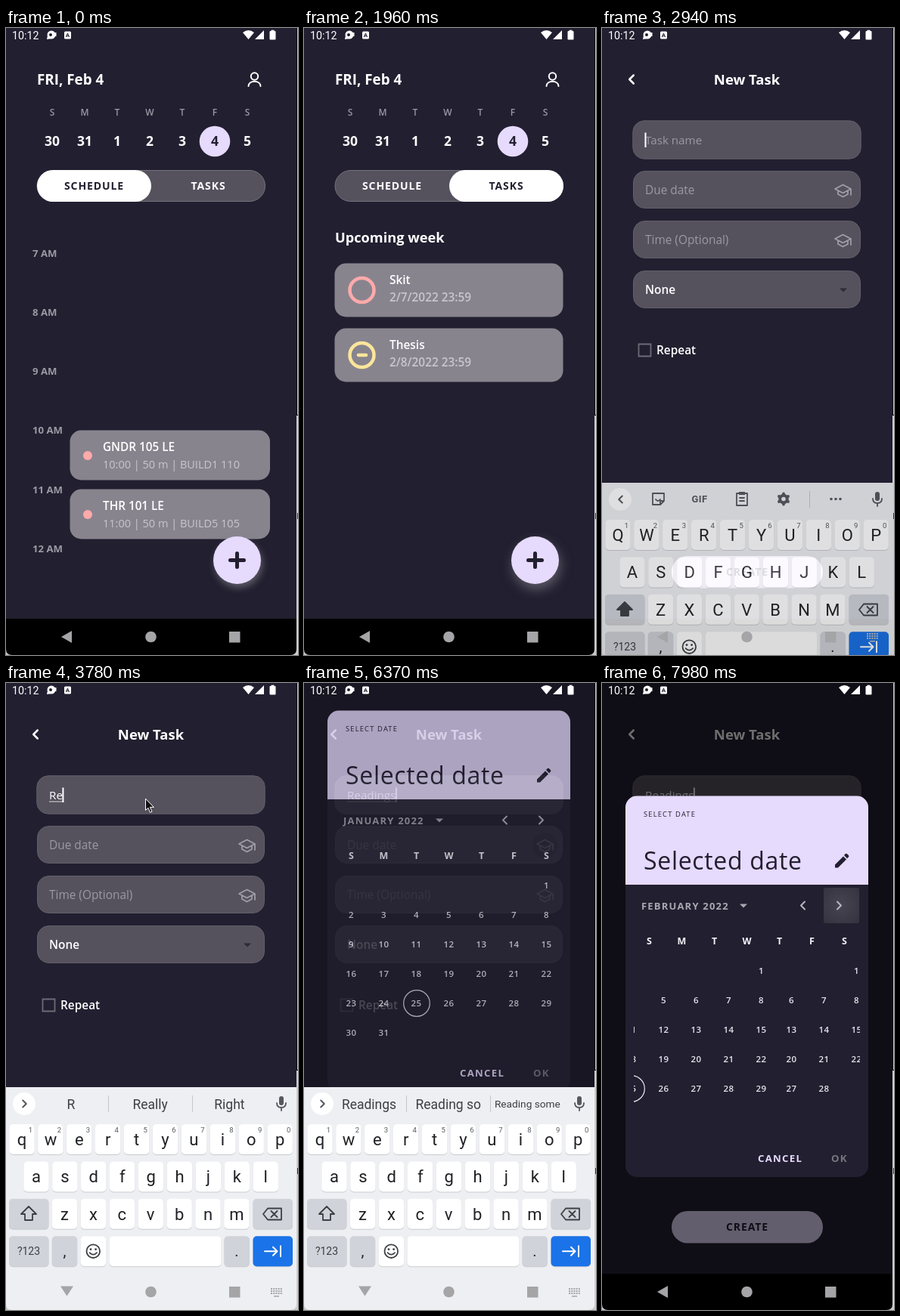
Write an HTML page with a canvas that moves like this. It is 386 px wide and 830 px high and loops after 8 s.

```html
<!DOCTYPE html>
<html lang="en">
<head>
<meta charset="utf-8">
<title>Planner</title>
<style>
html, body { margin: 0; width: 100%; height: 100%; overflow: hidden; background: #221f30; }
canvas { display: block; }
</style>
</head>
<body>
<canvas id="stage" width="386" height="830"></canvas>
<script>
const W = 386, H = 830, SCREEN = 384, LOOP = 8000, STEP = 70;
const APP = '"Open Sans", "Noto Sans", sans-serif', SYS = 'Roboto, sans-serif';
const BG = '#221f30', LILAC = '#e6dafd', CARD = '#88848e', FIELD = '#55525e';
const PINK = '#ffaaaa', YELLOW = '#fbe59b', MUTED = '#9b99a3', INK = '#202124', ICON = '#55585e';

const screenCtx = document.getElementById('stage').getContext('2d');
const spare = Object.assign(document.createElement('canvas'), { width: W, height: H }).getContext('2d');
let g = screenCtx;

// Drawing helpers
function text(s, x, y, size, weight, color, align = 'left', gap = 0, family = APP) {
  g.font = `${weight} ${size}px ${family}`;
  g.letterSpacing = gap + 'px';
  g.textAlign = align;
  g.fillStyle = color;
  g.fillText(s, x, y + size * 0.357);
}
const center = (s, x, y, size, weight, color, gap, family) =>
  text(s, x, y, size, weight, color, 'center', gap, family);
function rect(x, y, w, h, color) { g.fillStyle = color; g.fillRect(x, y, w, h); }
function box(x, y, w, h, r, color, border) {
  g.beginPath();
  g.roundRect(x, y, w, h, r);
  g.fillStyle = color;
  g.fill();
  if (border) { g.strokeStyle = border; g.lineWidth = 1; g.stroke(); }
}
function dot(x, y, r, color) {
  g.beginPath(); g.arc(x, y, r, 0, 7); g.fillStyle = color; g.fill();
}
function ring(x, y, r, width, color) {
  g.beginPath(); g.arc(x, y, r, 0, 7);
  g.strokeStyle = color; g.lineWidth = width; g.stroke();
}
function line(d, color, width = 2) {
  g.strokeStyle = color; g.lineWidth = width; g.stroke(new Path2D(d));
}
function fill(d, color) { g.fillStyle = color; g.fill(new Path2D(d)); }
function chevron(x, y, dir, size, color, width) {
  line(`M${x - dir * size / 2} ${y - size} l${dir * size} ${size} l${-dir * size} ${size}`, color, width);
}
function clipped(x, y, w, h, draw) {
  g.save(); g.beginPath(); g.rect(x, y, w, h); g.clip(); draw(); g.restore();
}
function layer(alpha, draw, dy = 0, scale = 1) {
  if (alpha <= 0) return;
  g = spare;
  g.clearRect(0, 0, W, H);
  draw();
  g = screenCtx;
  g.globalAlpha = alpha;
  g.drawImage(spare.canvas, W / 2 * (1 - scale), H / 2 * (1 - scale) + dy, W * scale, H * scale);
  g.globalAlpha = 1;
}

// Value held at each step of a short move
function moved(t, start, values, before = 0) {
  const i = Math.floor((t - start) / STEP);
  return i < 0 ? before : values[Math.min(i, values.length - 1)];
}

function statusBar() {
  text('10:12', 8, 10, 14.3, 400, '#fff', 'left', 0, SYS);
  dot(60, 9, 5.5, '#fff');
  fill('M54 15 l1 -5 l5 4z', '#fff');
  dot(59, 9, 2, BG);
  rect(65, 6, 1.5, 5, '#fff');
  box(77, 4.5, 9, 10, 1.5, '#fff');
  center('A', 81.5, 9.5, 8, 700, BG, 0, SYS);
  fill('M313 6 Q320.5 0 328 6 L320.5 15z M329 15 L341 3 V15z', '#fff');
  box(348.5, 4, 8, 11.5, 1, '#fff');
  rect(350.5, 2.7, 4, 2, '#fff');
}

function homeHeader(p) {
  text('FRI, Feb 4', 41, 68, 18.8, 700, '#fff');
  ring(328.5, 64, 4.7, 2, '#fff');
  line('M320.5 77 C320.5 68.5 336.5 68.5 336.5 77', '#fff');
  dot(276, 150, 20.3, LILAC);
  ['30', '31', '1', '2', '3', '4', '5'].forEach((day, i) => {
    const x = 61 + i * 43;
    center('SMTWTFS'[i], x, 112, 12, 600, MUTED);
    center(day, x, 150, 17.5, 700, i === 5 ? BG : '#fff');
  });
  const x = 41 + 151 * p;
  const labels = color => {
    center('SCHEDULE', 116.5, 209.5, 14, 700, color, 0.9);
    center('TASKS', 267.5, 209.5, 14, 700, color, 0.9);
  };
  box(41, 188.5, 301.5, 41, 20.5, FIELD, '#72707a');
  labels('#fff');
  g.save();
  g.beginPath();
  g.roundRect(x, 188, 151, 42, 21);
  g.clip();
  rect(x, 188, 151, 42, '#fff');
  labels(BG);
  g.restore();
}

function schedule() {
  for (let i = 0; i < 6; i++) text(`${7 + i} AM`, 35, 298 + i * 78.2, 13.2, 700, MUTED);
  [['GNDR 105 LE', '10:00 | 50 m | BUILD1 110'], ['THR 101 LE', '11:00 | 50 m | BUILD5 105']]
    .forEach(([title, detail], i) => {
      const y = 532.5 + i * 78;
      box(84.5, y, 264.5, 66, 15, CARD);
      dot(108, y + 33.5, 6, PINK);
      text(title, 128, y + 22.5, 15.3, 600, '#fff');
      text(detail, 128, y + 45.5, 14.5, 500, '#c8c6cc');
    });
}

function taskList() {
  text('Upcoming week', 41, 277.5, 18.2, 700, '#fff');
  [['Skit', '2/7/2022 23:59', PINK], ['Thesis', '2/8/2022 23:59', YELLOW]]
    .forEach(([title, due, color], i) => {
      const y = 312 + i * 86;
      box(40.5, y - 0.5, 302, 71, 15, CARD);
      ring(76.5, y + 35, 16, 4.5, color);
      if (i) line(`M72 ${y + 35} h10`, color, 4.5);
      text(title, 113, y + 22, 15.4, 600, '#fff');
      text(due, 113, y + 45, 15.4, 600, '#c8c6cc');
    });
}

function addButton(pressed) {
  g.save();
  g.shadowColor = 'rgba(135,132,142,.6)';
  g.shadowBlur = pressed ? 15 : 10;
  g.shadowOffsetX = 2;
  g.shadowOffsetY = pressed ? 7 : 5;
  dot(305.5, 704.5, 31.5, LILAC);
  g.restore();
  line('M296.5 704.5 h18 M305.5 695.5 v18', BG, 5);
}

function home(t) {
  const p = moved(t, 980, [0.238, 0.55, 0.78, 0.91, 0.98, 1]);
  rect(0, 0, SCREEN, H, BG);
  homeHeader(p);
  clipped(0, 240, SCREEN, 542, () => {
    g.translate(-p * SCREEN, 0);
    if (p < 1) schedule();
    g.translate(SCREEN, 0);
    if (p > 0) taskList();
  });
  addButton(t >= 1960);
}

function gradCap(y) {
  line(`M308 ${y - 2} l10.5 -5.5 l10.5 5.5 l-10.5 5.5z M312 ${y} v5 l6.5 3.5 l6.5 -3.5 v-5 M329 ${y - 2} v8`, '#a19fa8', 1.7);
}

const WORD = 'Readings', TYPED_AT = [3570, 3780, 3850, 4410, 4620, 4690, 4760, 4830];
const typed = t => WORD.slice(0, TYPED_AT.filter(at => at <= t).length);

function newTask(t) {
  rect(0, 0, SCREEN, H, BG);
  chevron(39, 68, -1, 5.5, '#fff', 2.5);
  center('New Task', 191.5, 68, 18.5, 700, '#fff');
  const focused = t >= 2800, name = typed(t);
  ['', 'Due date', 'Time (Optional)', 'None'].forEach((label, i) => {
    const grow = focused && !i ? 0.7 : 0;
    box(41.5 - grow, 123.5 + i * 66 - grow, 300 + 2 * grow, 49 + 2 * grow, 15, FIELD, '#625f6a');
    text(label, 57, 148.5 + i * 66, 15.4, i === 3 ? 600 : 500, i === 3 ? '#fff' : MUTED);
  });
  text(name || 'Task name', 57, 148.5, 15.2, 500, name ? '#fff' : MUTED);
  const end = name ? g.measureText(name).width : 0;
  if (name) rect(57, 156.5, end, 1, '#ddd');
  const caret = (t >= 2870 && t < 3360) || (t >= 3570 && t < 5530) || t >= 6090;
  if (caret) rect(56.5 + end, 138.5, 2, 19.5, '#fff');
  if (t >= 6300 && t < 6720) dot(318.5, 215, 17, 'rgba(0,0,0,.2)');
  gradCap(215);
  gradCap(281);
  fill('M314 344.5 h10 l-5 5z', '#2d2a39');
  g.lineJoin = 'miter';
  line('M48.5 418.5 h16 v16 h-16z', '#6e6b77', 1.8);
  g.lineJoin = 'round';
  text('Repeat', 72, 427, 15.4, 600, '#fff');
  box(92, 699, 200, 42.5, 21, LILAC);
  center('CREATE', 192, 720.5, 14, 700, BG, 0.9);
}

// Month pages: the date grid scrolls sideways under fixed weekday names
function monthPage(x, firstDay, days, circled) {
  for (let d = 1; d <= days; d++) {
    const cell = firstDay + d - 1;
    const cx = x + 62.5 + (cell % 7) * 43, cy = 381 + Math.floor(cell / 7) * 39;
    center(String(d), cx, cy, 11.5, 600, '#e9e7ee', 0.5);
    if (d === circled) ring(cx + 0.5, cy, 17.3, 1.2, '#e9e7ee');
  }
}

function dialog(t) {
  const turn = moved(t, 7840, [0, 0.13, 0.369]) * 298;
  box(31, 149.5, 321, 504.5, 15, BG);
  box(31, 149.5, 321, 117.5, [15, 15, 0, 0], LILAC);
  text('SELECT DATE', 55, 174, 9.3, 500, BG, 'left', 1.2);
  text('Selected date', 55, 236, 32, 500, BG, 'left', 0.7);
  fill('M308 244.5 v-4 l11 -11 l4 4 l-11 11z M320 228 l2 -2 q1 -.6 2 .2 l2 2 q.8 1 0 2 l-2 2z', BG);
  const label = turn ? 'FEBRUARY 2022' : 'JANUARY 2022';
  text(label, 52, 295, 13, 700, '#aaa8b1', 'left', 1.2);
  const x = turn ? 182 : 174;
  fill(`M${x} 292.5 h10 l-5 5z`, '#aaa8b1');
  if (t >= 7840) {
    const glow = g.createRadialGradient(316, 294, 3, 316, 294, 34);
    glow.addColorStop(0, t < 7910 ? '#393643' : '#464350');
    glow.addColorStop(1, '#35323f');
    box(293, 271, 47, 47, 3, glow);
  }
  chevron(265.5, 294.5, -1, 5, '#b9b7c0', 2);
  chevron(313.5, 294.5, 1, 5, '#b9b7c0', 2);
  [...'SMTWTFS'].forEach((s, i) => center(s, 62.5 + i * 43, 342, 12.5, 700, '#f4f2f8'));
  clipped(42, 360, 299, 235, () => {
    monthPage(-turn, 6, 31, 25);
    if (turn) monthPage(298 - turn, 2, 28);
  });
  text('CANCEL', 206, 629, 13.2, 700, LILAC, 'left', 1.3);
  text('OK', 303, 629, 13.2, 700, '#78757f', 'left', 1.2);
}

function suggestions(t) {
  if (t >= 5040) return ['Readings', 'Reading so', 'Reading some'];
  if (t >= 4550) return ['Reading', 'Read', 'Readings'];
  if (t >= 4200) return ['Rea', 'Really', 'Read'];
  if (t >= 3850) return ['', 'Really', 'Read'];
  return ['R', 'Really', 'Right'];
}

function toolbar(t, typing) {
  dot(24, 557, 15, '#fff');
  chevron(24.5, 557, typing ? 1 : -1, 4.5, ICON, 2);
  box(361, 547, 6, 12, 3, ICON);
  line('M358 556 q0 6 6 6 q6 0 6 -6 M364 562 v4', ICON, 1.8);
  if (typing) {
    suggestions(t).forEach((word, i) => {
      g.font = `400 17.5px ${SYS}`;
      g.letterSpacing = '0px';
      const size = 17.5 * Math.min(1, 87 / (g.measureText(word).width || 1));
      center(word, 86 + i * 104.7, 557.5, size, 400, '#3c4043', 0, SYS);
    });
    rect(135, 546, 1, 22, '#c4c6ca');
    rect(246, 546, 1, 22, '#c4c6ca');
    return;
  }
  line('M67 549 h15 v10 l-5 5 h-10z M77 564 v-5 h5 M71 557 q3 4 6 0', ICON, 1.8);
  center('GIF', 129, 556.5, 13, 700, ICON, 0.4, SYS);
  line('M178 549 h14 v16 h-14z M182 555 h6 M182 559 h6', ICON, 1.8);
  rect(181, 547, 8, 4, ICON);
  ring(240, 556.5, 4.8, 4, ICON);
  for (let i = 0; i < 6; i++) {
    const a = i * Math.PI / 3;
    dot(240 + 7 * Math.sin(a), 556.5 + 7 * Math.cos(a), 1.9, ICON);
  }
  rect(274, 546, 1, 22, '#c4c6ca');
  for (let i = 0; i < 3; i++) dot(303 + i * 6, 556.5, 1.8, ICON);
}

function key(x, y, w, color) {
  box(x, y - 19.5, w, 40.5, 5, '#c9cbd0');
  box(x, y - 20, w, 40, 5, color);
}

function keyboard(t) {
  const typing = t >= 3570, GREY = '#d1d3da';
  rect(0, 535, SCREEN, 295, '#eeeff2');
  toolbar(t, typing);
  [['qwertyuiop', 21], ['asdfghjkl', 40], ['zxcvbnm', 77.5]].forEach(([row, x0], r) => {
    [...row].forEach((c, i) => {
      const x = x0 + i * 37.9, y = 604 + r * 49.4;
      key(x - 16.7, y, 33.4, '#fff');
      center(typing ? c : c.toUpperCase(), x, y, 22, 400, INK, 0, SYS);
      if (!r) center(String((i + 1) % 10), x + 11.5, 592, 9.5, 400, '#55585e', 0, SYS);
    });
  });
  const y3 = 702.8, y4 = 752.2;
  key(4, y3, 52.5, GREY);
  key(326.5, y3, 52.5, GREY);
  const arrow = 'M30 693 l10 10 h-5 v8 h-10 v-8 h-5z';
  if (!typing) fill(arrow, '#3c4043');
  line(arrow, '#3c4043', 1.8);
  line('M340 703 l6 -7.5 h18 v15 h-18z M350.5 699 l8 8 M358.5 699 l-8 8', '#3c4043', 1.8);
  key(4, y4, 52.5, GREY);
  center('?123', 30, y4, 14, 400, '#3c4043', 0, SYS);
  key(60.8, y4, 33.4, GREY);
  center(',', 77.5, y4, 20, 400, INK, 0, SYS);
  key(98.7, y4, 33.4, '#fff');
  ring(115.3, y4, 8.8, 1.8, '#3c4043');
  dot(112, y4 - 2.5, 1.4, '#3c4043');
  dot(118.6, y4 - 2.5, 1.4, '#3c4043');
  line(`M110.5 ${y4 + 2} q4.8 5 9.6 0`, '#3c4043', 1.7);
  key(136.5, y4, 148, '#fff');
  key(288.5, y4, 33.4, GREY);
  center('.', 305, y4, 20, 400, INK, 0, SYS);
  key(326.5, y4, 52.5, '#1a73e8');
  line(`M342 ${y4} h16 M353 ${y4 - 5.5} l5.5 5.5 l-5.5 5.5 M363 ${y4 - 7} v14`, '#fff', 2);
}

function navIcons(keysUp, settled) {
  const c = '#a5a5a7';
  fill(settled ? 'M72 798.5 h17 l-8.5 13z' : 'M73 806 l14 -8 v16z', c);
  dot(191.5, 806, 7.3, c);
  rect(295, 799, 14.5, 14.5, c);
  if (!keysUp) return;
  for (let i = 0; i < 15; i++) rect(350 + (i % 5) * 3.2, 801 + Math.floor(i / 5) * 3, 2, 2, c);
  rect(354, 811, 7, 1.5, c);
}

function pointer() {
  const d = 'M184.5 153.5 v15 l3.4 -3.2 l2.6 6 l2.5 -1.1 l-2.6 -5.8 h4.6z';
  fill(d, '#111');
  line(d, '#fff', 1);
}

// Rounded lower screen corners and the strip of desktop on the right
function frameEdge() {
  fill('M0 822 Q0 830 8 830 H0z M384 822 Q384 830 376 830 H384z', '#c8c8ca');
  rect(384, 0, 1, 513, '#08080c');
  rect(385, 0, 1, 513, '#cfcfd1');
  rect(384, 513, 2, 317, '#cfcfd1');
  rect(384, 512, 2, 1, '#08080c');
  rect(385, 642, 1, 8, '#333');
}

function draw(t) {
  const arrive = moved(t, 2100, [0.15, 0.45, 0.75, 0.9, 0.97, 0.99, 1]);
  const keysIn = moved(t, 2800, [0, 0.45, 0.773, 0.91, 0.98, 1]);
  const keysOut = moved(t, 6440, [0.06, 0.32, 0.65, 0.9, 1]);
  const keysAlpha = moved(t, 2800, [0, 0.5, 0.86, 0.96, 1]) * moved(t, 6440, [1, 0.95, 0.75, 0.4, 0], 1);
  const scrim = moved(t, 6300, [0.15, 0.3, 0.45, 0.57]);
  const dialogAlpha = moved(t, 6300, [0.3, 0.72, 0.95, 1]);
  const dialogY = moved(t, 6440, [-113, -65, -20, -4, 0], -113);

  g.clearRect(0, 0, W, H);
  g.lineCap = g.lineJoin = spare.lineCap = spare.lineJoin = 'round';
  if (arrive < 1) home(t);
  layer(arrive, () => newTask(t), 0, 0.9 + 0.1 * arrive);
  if (scrim) rect(0, 0, SCREEN, H, `rgba(0,0,0,${scrim})`);
  layer(dialogAlpha, () => dialog(t), dialogY);
  rect(0, 782, SCREEN, 48, '#000');
  layer(keysAlpha, () => keyboard(t), 295 * (1 - keysIn + keysOut));
  navIcons(keysAlpha > 0.45, keysIn > 0.95 && keysAlpha > 0.45);
  statusBar();
  if (t >= 3290 && t < 5320) pointer();
  frameEdge();
}

function tick(now) {
  draw(Math.floor((now % LOOP) / STEP) * STEP);
  requestAnimationFrame(tick);
}
requestAnimationFrame(tick);
</script>
</body>
</html>
```
